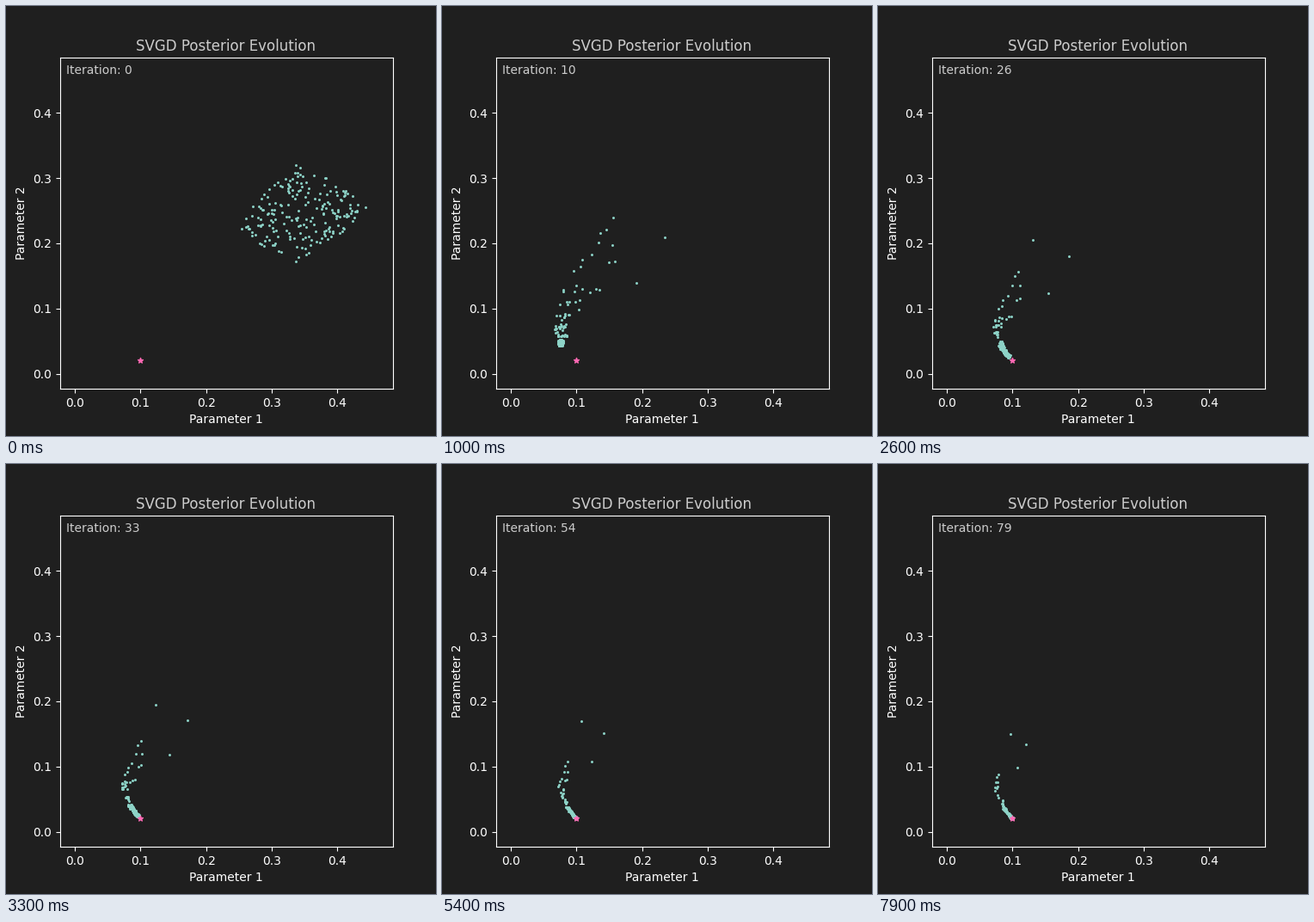
Animation of 500 by 500 pixels, one loop 8 s. Source, as a matplotlib script:

```python
import numpy as np
import matplotlib.pyplot as plt
from matplotlib.animation import FuncAnimation

FRAMES, STEP_MS = 80, 100
WARMUP = 10                              # iterations of the first fast collapse
N_ARM, N_HEAD = 64, 134
LIMITS = (-0.023, 0.485)
BG, TEAL, PINK, GREY = "#1f1f1f", "#8dd3c7", "#ff69b4", "#cccccc"

# Geometry is in stage pixels, y down.
BEND = np.array([132.5, 385.0])          # where the trail turns to the optimum
OPTIMUM = np.array([156.3, 412.5])

# The three corners of the cloud lag behind: at the start, after the collapse
CORNERS0 = np.array([(337, 185), (418, 234), (337, 297)], float)
CORNERS1 = np.array([(199, 246), (259, 269), (226, 322)], float)

rng = np.random.default_rng(12)


def start_cloud(n):
    """Uniform points in a bulging, slightly sheared diamond."""
    u, v = rng.uniform(-1, 1, (2, 6 * n))
    inside = np.abs(u) ** 1.2 + np.abs(v) ** 1.2 < 1
    u, v = u[inside][:n], v[inside][:n]
    return np.column_stack([342 + 75 * u, 242 + 56 * v - 10 * u])


cloud = start_cloud(N_ARM + N_HEAD)
score = cloud[:, 0] + 0.8 * np.abs(cloud[:, 1] - 245) + rng.normal(0, 12, len(cloud))
cloud = cloud[np.argsort(-score)]
arm0, head0 = cloud[:N_ARM], cloud[N_ARM:]

# Two arms: the upper starts fall on the left one, the lower on the right one
reach = (1 - np.arange(N_ARM) / N_ARM) ** 2.5
side = np.clip((arm0[:, 1] - 205) / 75 + rng.normal(0, 0.15, N_ARM), 0, 1)
side = side * side * (3 - 2 * side)
rise = 6 + (120 - 74 * side) * reach
left_dx = rise ** 2 / 270 - 2.5
right_dx = 7 + rise ** 2 / 52
arm_dx = left_dx + side * (right_dx - left_dx) + rng.normal(0, 0.6, N_ARM)
arm_rate = 1.65 + 2.8 * (1 - reach) + 0.4 * side

tail0 = np.vstack([CORNERS0, arm0])
tail1 = np.vstack([CORNERS1, BEND + np.column_stack([arm_dx, -rise])])
rate_y = np.append(np.full(3, 0.67), arm_rate)
rate_x = rate_y + np.append(np.full(3, 0.5), 0.5 - 0.7 * side)
tail_sharp = np.append(np.ones(3), 1 + 1.5 * (1 - reach))[:, None]

head_rate = 0.08 + 0.64 * rng.random(N_HEAD) ** 0.8
head_jitter = np.clip(rng.normal(0, 1.7, (N_HEAD, 2)), -3.2, 3.2)


def remaining(t, sharp):
    """Share of the collapse still ahead, from 1 at the start to 0."""
    s = np.sqrt(min(t / WARMUP, 1))
    return (np.exp(-sharp * s) - np.exp(-sharp)) / (1 - np.exp(-sharp))


def tail_at(t, elapsed):
    g = (elapsed / (np.sqrt(FRAMES - 1) - np.sqrt(WARMUP))) ** 1.1
    d = (tail1 - BEND) * np.exp(-g * np.column_stack([rate_x, rate_y]))
    depth = -np.log(-d[:, 1] / 90)
    slide = 1 - np.exp(-0.5 * np.maximum(0, depth - 2.3))
    p = BEND + d + slide[:, None] * (OPTIMUM - BEND)
    return p + (tail0 - tail1) * remaining(t, tail_sharp)


def head_at(t, elapsed):
    slide = 1 - 0.78 * np.exp(-head_rate * elapsed)
    if t < WARMUP:
        slide = slide + 0.72 * np.exp(-((t - 5) / 2.5) ** 2)
    spread = 0.3 + 0.7 * np.exp(-0.5 * elapsed)
    p = BEND + slide[:, None] * (OPTIMUM - BEND) + head_jitter * spread
    return p + (head0 - p) * remaining(t, 4.0)


def particles(t):
    elapsed = np.sqrt(max(t, WARMUP)) - np.sqrt(WARMUP)
    p = np.vstack([tail_at(t, elapsed), head_at(t, elapsed)]) + 0.4
    p[:, 1] = 500 - p[:, 1]
    return ax.transData.inverted().transform(p)


plt.style.use("dark_background")
plt.rcParams["font.family"] = "DejaVu Sans"
fig, ax = plt.subplots(figsize=(5, 5), dpi=100, facecolor=BG)
ax.set_facecolor(BG)
ax.set(xlim=LIMITS, ylim=LIMITS, xlabel="Parameter 1", ylabel="Parameter 2")
ax.set_xticks(np.arange(5) / 10)
ax.set_yticks(np.arange(5) / 10)
ax.set_title("SVGD Posterior Evolution", color=GREY, x=0.4975)

dots = ax.scatter(*particles(0).T, s=4.6, color=TEAL, linewidths=0, zorder=2)
ax.scatter([0.1], [0.02], s=20, marker="*", color=PINK, zorder=3)
label = ax.text(0.02, 0.95, "Iteration: 0", color=GREY, transform=ax.transAxes)


def update(i):
    dots.set_offsets(particles(i))
    label.set_text(f"Iteration: {i}")
    return dots, label


anim = FuncAnimation(fig, update, frames=FRAMES, interval=STEP_MS, repeat=True)
plt.show()
```
